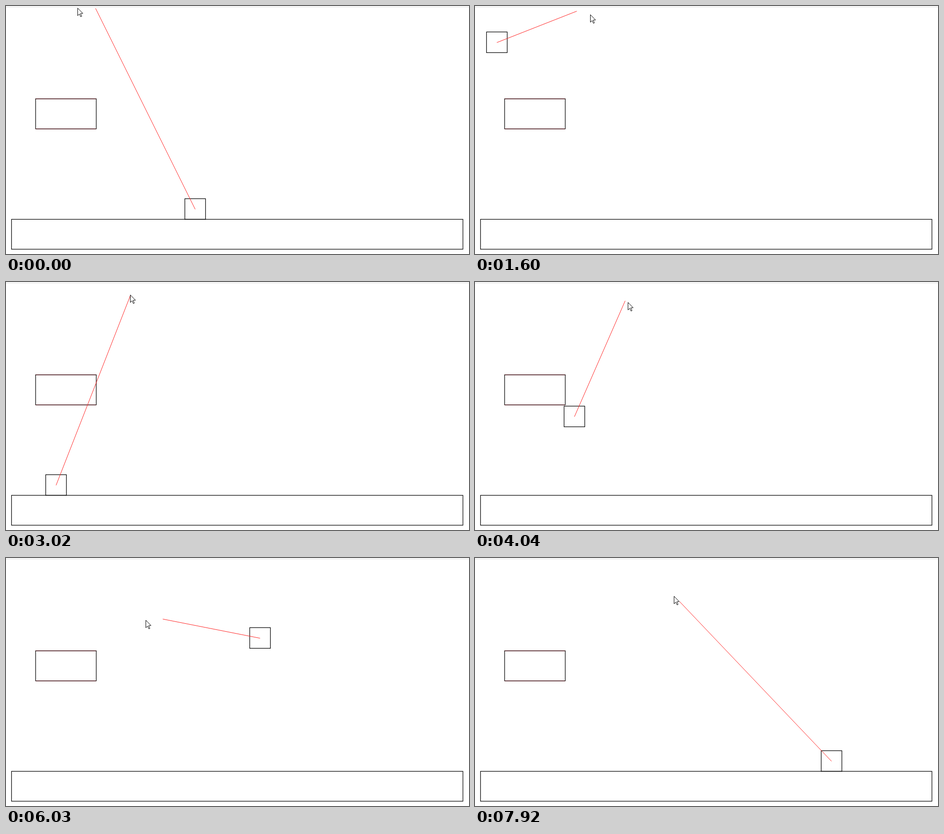
These frames come from a looping animation (985 px wide and 528 px high, 8 s). An HTML page with a canvas:

```html
<!DOCTYPE html>
<html lang="en">
<head>
<meta charset="utf-8">
<title>Box launcher</title>
<style>
  html, body { margin: 0; width: 100%; height: 100%; overflow: hidden; background: #fff; }
  canvas { display: block; }
</style>
</head>
<body>
<canvas id="stage" width="985" height="528"></canvas>
<script>
const ctx = document.getElementById('stage').getContext('2d');

// Motion is measured in ticks; speeds are pixels per tick.
const LOOP = 8000, TICK = 68.25, TICKS = Math.ceil(LOOP / TICK);
const STEPS = 20, GRAVITY = 3.73, SLIDE = 4.5;
const HALF = 22, REST = 432;
const platform = { x: 63, y: 197.5, w: 129, h: 64 };

// Each click throws the box with a new velocity.
const clicks = [
  { at: 8.75, vx: -25.25, vy: -51.5 },
  { at: 30.75, vx: 20.85, vy: 5 },
  { at: 54.25, vx: 13.81, vy: -48.2 },
  { at: 75.75, vx: 13.72, vy: -44.25 },
];

// Pointer glides: y follows x's progress raised to the power of bend.
const glides = [
  { from: 18.9, to: 24.4, x: 264, y: 27, bend: 3 },
  { from: 52.7, to: 59.4, x: 326, y: 43, bend: 3 },
  { from: 59.4, to: 71, x: 489, y: 112, bend: 1 },
  { from: 81, to: 92, x: 214, y: 141, bend: 1 },
  { from: 92, to: 97.5, x: 332, y: 158, bend: 1 },
  { from: 100, to: 115, x: 435, y: 91, bend: 0.6 },
  { from: 115, to: 117, x: 411, y: 71, bend: 1 },
];

const mix = (a, b, u) => a + (b - a) * u;
const clamp = u => Math.max(0, Math.min(1, u));
const smooth = u => u * u * (3 - 2 * u);

function simulate() {
  const h = 1 / STEPS, ceiling = platform.y + platform.h + HALF;
  const path = [];
  let x = 402, y = REST, vx = 1, vy = 0;
  for (let step = 0; step <= TICKS * STEPS; step++) {
    if (step % STEPS === 0) path.push([Math.round(x), Math.round(y)]);
    const click = clicks.find(c => c.at * STEPS === step);
    if (click) ({ vx, vy } = click);

    if (y === REST && vy === 0) {
      vx *= Math.exp(-h / SLIDE);
    } else {
      const before = y;
      y += vy * h + GRAVITY * h * h / 2;
      vy += GRAVITY * h;
      const below = x + HALF > platform.x && x - HALF < platform.x + platform.w;
      if (below && before >= ceiling && y < ceiling) [y, vy] = [ceiling, 0];
      if (y >= REST) [y, vy] = [REST, 0];
    }
    x += vx * h;
  }
  return path;
}

function pointerAt(tick) {
  const entry = 1 - (1 - clamp((tick + 1) / 2)) ** 3;
  let x = mix(190, 146, entry), y = mix(3, 4, entry);
  for (const g of glides) {
    const u = smooth(clamp((tick - g.from) / (g.to - g.from)));
    x = mix(x, g.x, u);
    y = mix(y, g.y, u ** g.bend);
  }
  return [Math.round(x), Math.round(y)];
}

function line(color, x0, y0, x1, y1) {
  ctx.strokeStyle = color;
  ctx.beginPath();
  ctx.moveTo(x0, y0);
  ctx.lineTo(x1, y1);
  ctx.stroke();
}

function outline(x, y, w, h) {
  ctx.strokeStyle = '#000';
  ctx.strokeRect(x, y, w, h);
}

function drawPointer(x, y) {
  const shape = [[0, 0], [0, 16], [3.7, 12.6], [6.4, 18.4], [8.6, 17.4], [6, 11.5], [11, 11.3]];
  ctx.beginPath();
  shape.forEach(([dx, dy]) => ctx.lineTo(x + dx + 0.5, y + dy + 0.5));
  ctx.closePath();
  ctx.fillStyle = '#fff';
  ctx.strokeStyle = '#000';
  ctx.lineWidth = 1;
  ctx.fill();
  ctx.stroke();
}

const boxPath = simulate();

function draw(tick) {
  const [px, py] = pointerAt(tick);
  const [ax, ay] = pointerAt(tick - 1);
  const [bx, by] = boxPath[tick];
  const { x, y, w, h } = platform;

  ctx.fillStyle = '#fff';
  ctx.fillRect(0, 0, 985, 528);
  ctx.fillStyle = '#f5f5f5';
  ctx.fillRect(0, 0, 985, 4);

  if (clicks.some(c => tick >= c.at - 2 && tick < c.at + 0.75)) {
    ctx.fillStyle = '#ffff80';
    ctx.beginPath();
    ctx.arc(px, py, 15, 0, Math.PI * 2);
    ctx.fill();
  }

  ctx.lineWidth = 1.25;
  outline(11.7, 454.2, 960.4, 63.6);
  outline(x, y, w, h);
  line('#400008', x, y, x + w, y);
  line('#400008', x, y + h, x + w, y + h);
  outline(bx - 21.5, by - 21.7, 2 * HALF, 2 * HALF);
  ctx.lineWidth = 1;
  line('#ff2020', bx + 0.5, by + 0.8, ax + 0.5, ay + 2);
  drawPointer(px, py);
}

const start = performance.now();
function animate() {
  draw(Math.floor((performance.now() - start) % LOOP / TICK));
  requestAnimationFrame(animate);
}
animate();
</script>
</body>
</html>
```
